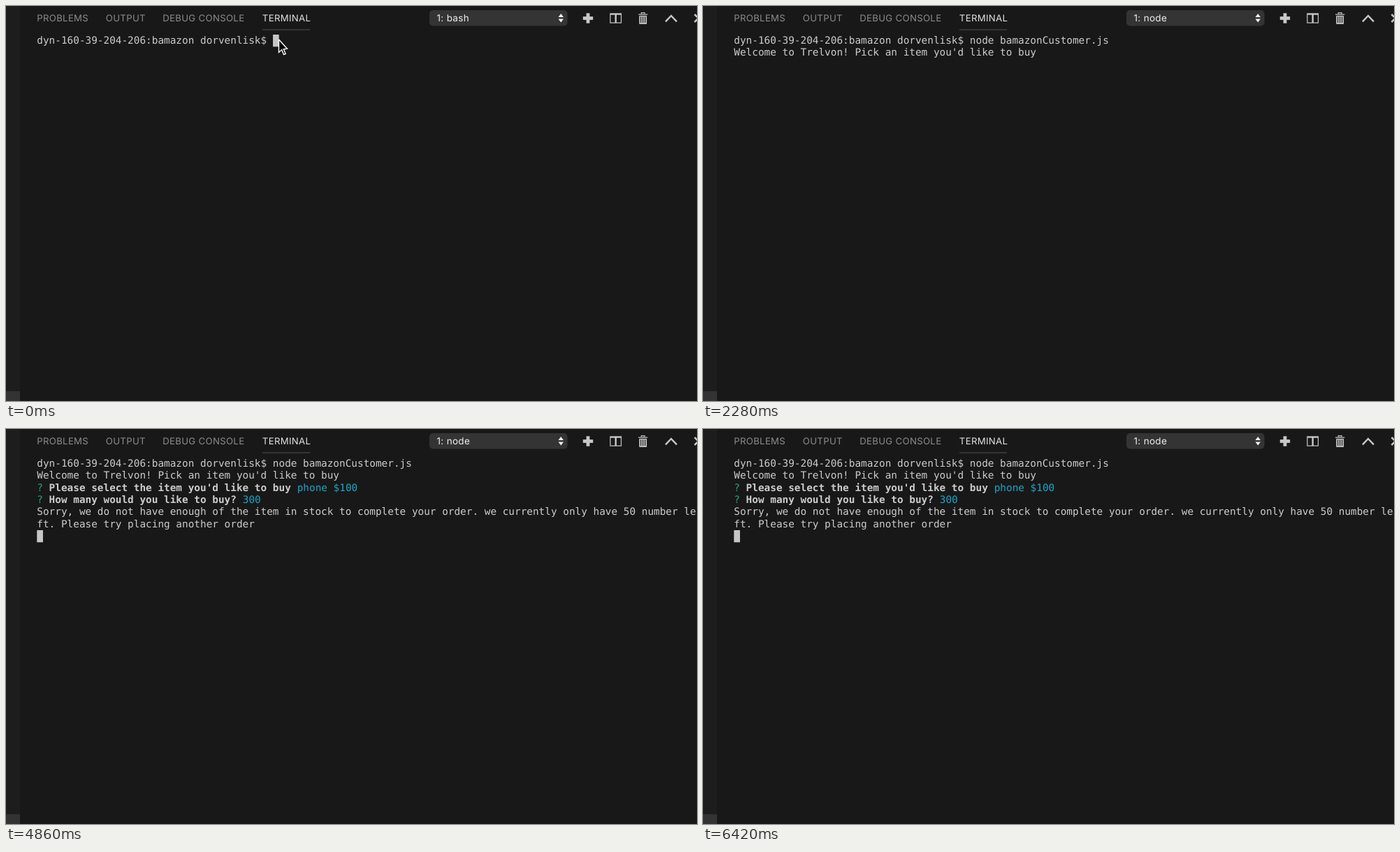
Recreate the animation shown at these times as an HTML page with a canvas. Size 989x566 px, loop 6.78 s.

```html
<!DOCTYPE html>
<html lang="en">
<head>
<meta charset="utf-8">
<title>Terminal session</title>
<style>
  html, body { margin: 0; width: 100%; height: 100%; overflow: hidden; background: #181818; }
  canvas { display: block; }
</style>
</head>
<body>
<canvas id="stage" width="989" height="566"></canvas>
<script>
const ctx = document.getElementById('stage').getContext('2d');
const LOOP = 6780;
const LEFT = 44.3, TOP = 41, CELL = 8.66, LINE = 17.33;
const BACK = '#181818', TEXT = '#cccccc', DIM = '#686868', CYAN = '#1ba6ca', GREEN = '#23a574', ICON = '#c8c8c8';

const PROMPT = 'dyn-160-39-204-206:bamazon dorvenlisk$ ';
const COMMAND = 'node bamazonCustomer.js ';
const ITEMS = ['blender $50', 'computer $300', 'coffee maker $25', 'Ondrith $10',
  'Tale of the Fern $15', 'A Dull Lantern $15'];

function rect(color, x, y, w, h) {
  ctx.fillStyle = color;
  ctx.fillRect(x, y, w, h);
}

function polygon(color, points) {
  ctx.beginPath();
  points.forEach(([x, y]) => ctx.lineTo(x, y));
  ctx.closePath();
  ctx.fillStyle = color;
  ctx.fill();
}

function line(color, width, points) {
  ctx.beginPath();
  points.forEach(([x, y]) => ctx.lineTo(x, y));
  ctx.strokeStyle = color;
  ctx.lineWidth = width;
  ctx.stroke();
}

function label(text, x, color, size = 13.2) {
  ctx.font = `${size}px Inter, sans-serif`;
  ctx.letterSpacing = '0.32px';
  ctx.fillStyle = color;
  ctx.fillText(text, x, 22.3);
  ctx.letterSpacing = '0px';
}

// Icons are drawn on a 16-unit grid centred on x.
function icon(x, paint) {
  ctx.save();
  ctx.translate(x - 9.6, 7.9);
  ctx.scale(1.2, 1.2);
  paint();
  ctx.restore();
}

function drawToolbar(shell) {
  label('PROBLEMS', 44.2, '#8c8c8c');
  label('OUTPUT', 142.8, '#8c8c8c');
  label('DEBUG CONSOLE', 224.2, '#8c8c8c');
  label('TERMINAL', 366.8, '#e4e4e4');
  rect('#505050', 367, 33.5, 68, 1);

  ctx.beginPath();
  ctx.roundRect(606, 6, 197.5, 22.5, 5);
  ctx.fillStyle = '#343434';
  ctx.fill();
  label('1: ' + shell, 616.5, '#f0f0f0', 13.5);
  polygon('#f0f0f0', [[790.5, 16], [794.3, 11], [798, 16]]);
  polygon('#f0f0f0', [[790.5, 18.5], [794.3, 23.5], [798, 18.5]]);

  // Plus
  icon(833, () => {
    rect(ICON, 2, 6, 12, 4);
    rect(ICON, 6, 2, 4, 12);
  });
  // Split panel
  icon(872.7, () => {
    rect(ICON, 1, 2, 14, 12);
    rect(BACK, 2, 4, 5, 9);
    rect(BACK, 9, 4, 5, 9);
  });
  // Trash can
  icon(911.7, () => {
    rect(ICON, 5.5, 1, 5, 2);
    rect(BACK, 6.5, 2, 3, 1);
    rect(ICON, 2.5, 3, 11, 1);
    rect(ICON, 3.5, 5, 9, 10);
    for (const x of [5, 7.5, 10]) rect(BACK, x, 6, 1, 7.5);
  });
  // Chevron and close
  line(ICON, 2.4, [[944, 22.3], [952, 14], [960, 22.3]]);
  line(ICON, 2.5, [[985.5, 12], [996.5, 23]]);
  line(ICON, 2.5, [[985.5, 23], [996.5, 12]]);
}

// A row is a list of [text, color, bold] runs.
function drawRow(runs, row) {
  let col = 0;
  for (const [text, color = TEXT, bold] of runs) {
    ctx.font = `${bold ? 'bold ' : ''}14.385px "DejaVu Sans Mono", monospace`;
    ctx.fillStyle = color;
    ctx.fillText(text, LEFT + col * CELL, TOP + 13.1 + row * LINE);
    col += text.length;
  }
}

function drawCursor([col, row]) {
  rect('#c6c6c6', LEFT + col * CELL, TOP + row * LINE, CELL, LINE);
}

function drawPointer() {
  const shape = [[390.5, 48], [390.5, 66.5], [394.7, 62.6], [397.5, 69.6],
    [400.2, 68.5], [397.3, 61.8], [402.5, 61.3]];
  polygon('#000', shape);
  line('#fff', 1.4, [...shape, shape[0]]);
}

const question = (text, answer, color) =>
  [['?', GREEN], [' ' + text + ' ', TEXT, true], [answer, color]];

function session(t) {
  const typed = t < 420 ? '' : t < 600 ? 'node ' : COMMAND;
  const rows = [[[PROMPT + typed]]];
  if (t < 1320) return { rows, cursor: [PROMPT.length + typed.length, 0] };
  if (t < 2280) return { rows, cursor: [0, 1] };

  rows.push([["Welcome to Trelvon! Pick an item you'd like to buy"]]);
  if (t < 2340) return { rows };

  const select = "Please select the item you'd like to buy";
  if (t < 3240) {
    rows.push(question(select, '(Use arrow keys)', DIM), [['❯ phone $100', CYAN]],
      ...ITEMS.map(item => [['  ' + item]]),
      [['(Move up and down to reveal more choices)', DIM]]);
    return { rows };
  }

  rows.push(question(select, 'phone $100', CYAN));
  const amount = '300'.slice(0, [4200, 4380, 4500].filter(key => t >= key).length);
  const done = t >= 4860;
  rows.push(question('How many would you like to buy?', amount, done ? CYAN : TEXT));
  if (!done) return { rows, cursor: [34 + amount.length, 3] };

  rows.push(
    [['Sorry, we do not have enough of the item in stock to complete your order. we currently only have 50 number le']],
    [['ft. Please try placing another order']]);
  return { rows, cursor: [0, 6] };
}

function frame() {
  const t = performance.now() % LOOP;
  const { rows, cursor } = session(t);
  ctx.textRendering = 'geometricPrecision';
  rect(BACK, 0, 0, 989, 566);
  rect('#1d1d1d', 0, 0, 20, 566);
  rect('#333333', 0, 552, 20, 14);
  drawToolbar(t < 1440 ? 'bash' : 'node');
  rows.forEach(drawRow);
  if (cursor) drawCursor(cursor);
  if (t < 420) drawPointer();
  requestAnimationFrame(frame);
}
frame();
</script>
</body>
</html>
```
